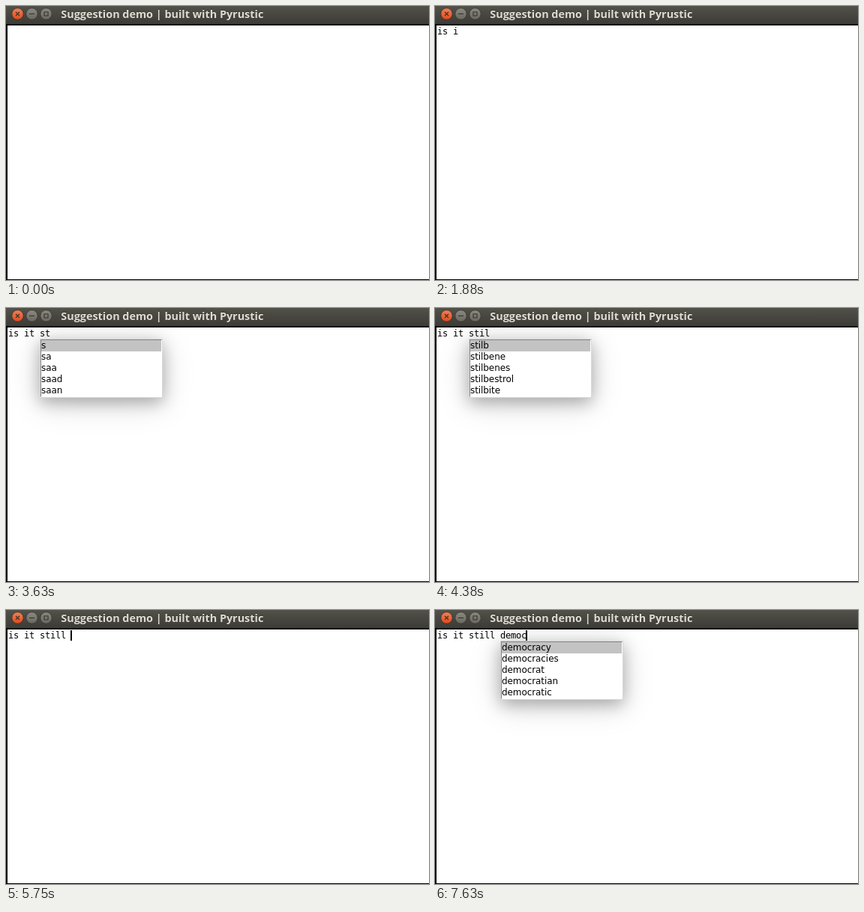
Write an HTML page that moves like this. It is 564 px wide and 366 px high and loops after 8 s.

```html
<!DOCTYPE html>
<html lang="en">
<head>
<meta charset="utf-8">
<title>Suggestion demo</title>
<style>
  html, body { margin: 0; width: 100%; height: 100%; overflow: hidden; background: #fff; }
  #stage { position: absolute; inset: 0; overflow: hidden; }
  #bar {
    position: absolute; left: 0; top: 0; width: 100%; height: 24px;
    background: linear-gradient(#53524a, #4a4942 35%, #3c3b37);
  }
  #bar svg { position: absolute; left: 0; top: 0; }
  #bar span {
    position: absolute; left: 73.3px; top: 0; white-space: pre;
    font: 700 14.4px/22px "Open Sans", "Noto Sans", sans-serif;
    color: #dfdbd2; text-shadow: 0 -1px 0 rgba(0, 0, 0, .35);
  }
  #field {
    position: absolute; left: 0; top: 24px; right: -2px; bottom: 0;
    box-sizing: border-box; border: solid #000; border-width: 2px 1px 1px 2px; background: #fff;
  }
  #text {
    position: absolute; left: 3px; top: 27px; white-space: pre; color: #000;
    font: 12px/14px "DejaVu Sans Mono", monospace; letter-spacing: calc(7px - 1ch);
  }
  #caret { position: absolute; top: 27px; width: 2px; height: 14px; background: #000; }
  #popup {
    position: absolute; top: 41px; width: 164px; height: 79px; box-sizing: border-box;
    border: 1px solid #d9d9d9; background: #fff;
    box-shadow: 0 6px 20px rgba(0, 0, 0, .28), 0 8px 44px rgba(0, 0, 0, .15);
    font: 12px/15px "DejaVu Sans", sans-serif; letter-spacing: -.08px; color: #000;
  }
  #list { border: 1px solid; border-color: #828282 #fff #fff #828282; }
  #list div { height: 15px; white-space: pre; }
  #list div:first-child { background: #c3c3c3; }
</style>
</head>
<body>
<div id="stage">
  <div id="field"></div>
  <div id="text"></div>
  <div id="caret"></div>
  <div id="popup">
    <div id="list"><div></div><div></div><div></div><div></div><div></div></div>
  </div>
  <div id="bar">
    <svg width="70" height="24" fill="none">
      <defs>
        <linearGradient id="hot" x2="0" y2="1">
          <stop stop-color="#f58057"/><stop offset="1" stop-color="#df4a1c"/>
        </linearGradient>
        <linearGradient id="dull" x2="0" y2="1">
          <stop stop-color="#8b8a82"/><stop offset="1" stop-color="#68675f"/>
        </linearGradient>
      </defs>
      <g stroke="#33322e" stroke-opacity=".75">
        <circle cx="15.5" cy="10.5" r="7.7" fill="url(#hot)"/>
        <circle cx="34.5" cy="10.5" r="7.7" fill="url(#dull)"/>
        <circle cx="53.5" cy="10.5" r="7.7" fill="url(#dull)"/>
      </g>
      <g stroke="#3a3026" stroke-width="1.1">
        <path d="M13 8l5 5M18 8l-5 5"/>
        <path d="M31 10.5h7"/>
        <path d="M51 8h5v5h-5z"/>
      </g>
    </svg>
    <span>Suggestion demo | built with Pyrustic</span>
  </div>
</div>
<script>
const LOOP = 8000, FRAME = 125, CELL = 7, LEFT = 3;
const BLINK = 901, BLINK_ON = 600;

const WORDS = {
  i: "i ia iamatology iamb iambe",
  is: "is isabelita isabnormal isaconitine isacoustic",
  it: "it ita itabirite itacism itacist",
  s: "s sa saa saad saan",
  st: "st sta stab stabbed stabber",
  sti: "sti stiacciato stib stibble stibbler",
  stil: "stilb stilbene stilbenes stilbestrol stilbite",
  still: "still stillage stillatitious stillatory stillbirth",
  d: "d da dab dabb dabba",
  de: "de dea deaccession deaccessioned deaccessioning",
  dem: "dem demagnetisable demagnetise demagnetised demagnetiser",
  demo: "demo demob demobbed demobbing demobilisation",
  democ: "democracy democracies democrat democratian democratic"
};

// [time, typed text]
const TYPED = [
  [0, ""], [500, "i"], [880, "is"], [1250, "is "], [1750, "is i"], [2250, "is it"],
  [2880, "is it "], [3380, "is it s"], [3630, "is it st"], [3880, "is it sti"],
  [4130, "is it stil"], [4500, "is it still"], [5130, "is it still "],
  [5880, "is it still d"], [6380, "is it still de"], [6630, "is it still dem"],
  [6880, "is it still demo"], [7380, "is it still democ"]
];

// [time, prefix listed, start column]
const LISTED = [
  [0, "i", 0], [1000, "is", 0], [1880, "i", 3], [2380, "it", 3],
  [3380, "s", 6], [3750, "st", 6], [4000, "sti", 6], [4380, "stil", 6], [4880, "still", 6],
  [5880, "d", 12], [6500, "de", 12], [6750, "dem", 12], [7000, "demo", 12], [7630, "democ", 12]
];

// [time, popup opacity]
const SHOWN = [
  [0, 0], [630, .4], [750, 1], [1250, .85], [1380, .35], [1500, 0],
  [2000, .4], [2130, 1], [2880, .85], [3000, .35], [3130, 0],
  [3500, .4], [3630, 1], [5130, .85], [5250, .35], [5380, 0], [6000, .4], [6130, 1]
];

const $ = id => document.getElementById(id);
const text = $("text"), caret = $("caret"), popup = $("popup");
const rows = [...$("list").children];
const at = (steps, t) => steps.findLast(s => s[0] <= t);

function caretOn(t) {
  const q = Math.floor(t / FRAME) * FRAME - FRAME;
  return q >= 0 && q % BLINK < BLINK_ON;
}

function draw(t) {
  const typed = at(TYPED, t)[1];
  const [, prefix, col] = at(LISTED, t);
  const alpha = at(SHOWN, t)[1];

  text.textContent = typed;
  caret.style.left = LEFT + CELL * typed.length - 1 + "px";
  caret.style.visibility = caretOn(t) ? "visible" : "hidden";

  const words = WORDS[prefix].split(" ");
  rows.forEach((row, i) => row.textContent = words[i]);
  popup.style.left = LEFT + CELL * col + "px";
  popup.style.opacity = alpha;
  popup.style.transform = alpha < 1 ? `scale(${.92 + .08 * alpha})` : "none";
}

const start = performance.now();
function tick() {
  draw((performance.now() - start) % LOOP);
  requestAnimationFrame(tick);
}
tick();
</script>
</body>
</html>
```
